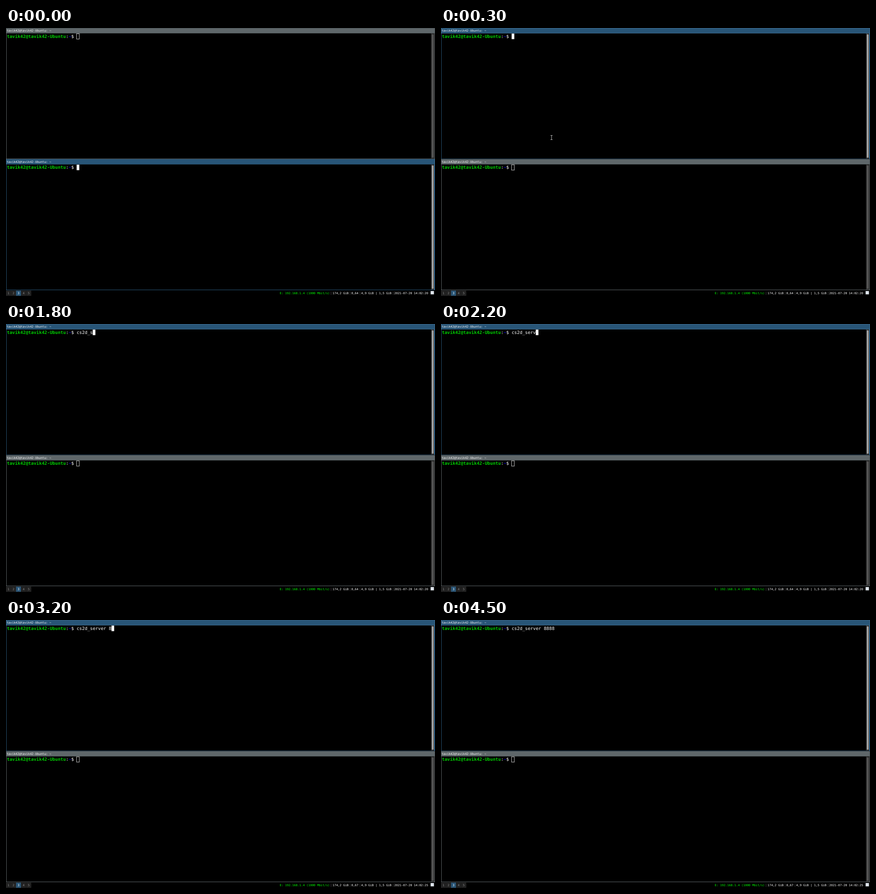
Animation of 947x592 px, one loop 5 s. Source, as an HTML page:

```html
<!DOCTYPE html>
<html lang="en">
<head>
<meta charset="utf-8">
<title>Two terminals</title>
<style>
  html, body { margin: 0; width: 100%; height: 100%; overflow: hidden; background: #000; }
  svg { display: block; width: 100vw; height: 100vh; }
  text { font-family: "DejaVu Sans Mono", monospace; white-space: pre; text-rendering: geometricPrecision; }
  .small { font-size: 6.555px; }
  .term { font-size: 9.832px; }
  .bold { font-weight: bold; }
</style>
</head>
<body>
<svg id="stage" viewBox="0 0 947 592" preserveAspectRatio="none"></svg>
<script>
const LOOP = 5000;
const CELL = 5.919;
const LEFT = 2;
const PROMPT = 26;
const USER = "tavik42";
const HOST = USER + "-Ubuntu";
const COMMAND = "cs2d_server 8888";

// [time, typed characters]
const KEYS = [[0, 0], [800, 1], [900, 2], [1400, 4], [1600, 5], [1800, 6], [1900, 7], [2000, 8],
  [2200, 9], [2300, 11], [2500, 12], [3200, 13], [3400, 15], [3600, 16]];
// [time, pointer height]; null hides it
const POINTER = [[0, null], [100, 334], [200, 302], [300, 242], [400, 211], [800, null]];
const FOCUS_AT = 300, CLOCK_AT = 3000, ENTER_AT = 3900;

const ACTIVE = { edge: "#4c7899", bar: "#285577", side: "#2e9ef4", trough: "#313131", thumb: "#a4a4a4" };
const IDLE = { edge: "#33383a", bar: "#5f676a", side: "#484e50", trough: "#2b2b2b", thumb: "#565656" };

const stage = document.getElementById("stage");

function add(tag, attrs, parent = stage) {
  const el = document.createElementNS("http://www.w3.org/2000/svg", tag);
  set(el, attrs);
  parent.appendChild(el);
  return el;
}

function set(el, attrs) {
  for (const key in attrs) el.setAttribute(key, attrs[key]);
}

function rect(x, y, width, height, fill, parent) {
  return add("rect", { x, y, width, height, fill }, parent);
}

function label(x, y, str, fill, cls = "small", parent) {
  const el = add("text", { x, y, fill, class: cls }, parent);
  el.textContent = str;
  return el;
}

const show = (el, on) => el.setAttribute("visibility", on ? "visible" : "hidden");
const at = (steps, t) => steps.filter(s => s[0] <= t).pop()[1];
const column = n => LEFT + n * CELL;

function makeWindow(y) {
  const g = add("g", { transform: `translate(0 ${y})` });
  const edge = rect(0, 0, 947, 12, "", g);
  const bar = rect(0.5, 0.5, 946, 11, "", g);
  const frame = rect(0, 12, 947, 277.5, "", g);
  const side = rect(946, 12, 1, 276.5, "", g);
  rect(1, 12, 945, 276.5, "#000", g);
  const trough = rect(938, 12, 8, 276.5, "", g);
  const thumb = rect(940, 13.7, 4, 273, "", g);
  thumb.setAttribute("rx", 2);
  label(1.4, 8, `${USER}@${HOST}: ~`, "#fff", "small", g);

  const row = (n, str, fill, cls = "term") => label(column(n), 21.6, str, fill, cls, g);
  row(0, `${USER}@${HOST}`, "#00cd00", "term bold");
  row(22, ":", "#fff");
  row(23, "~", "#0000cd", "term bold");
  row(24, "$", "#fff");
  const input = row(PROMPT, "", "#fff");

  const solid = rect(0, 12.4, CELL, 12.2, "#fff", g);
  const hollow = add("rect", { x: column(PROMPT) - 0.1, y: 12.6, width: CELL + 0.1, height: 11.8,
    fill: "none", stroke: "#e4e4e4", "stroke-width": 0.9 }, g);

  return {
    input, solid,
    focus(on) {
      const c = on ? ACTIVE : IDLE;
      set(edge, { fill: c.edge });
      set(bar, { fill: c.bar });
      set(frame, { fill: c.bar });
      set(side, { fill: c.side });
      set(trough, { fill: c.trough });
      set(thumb, { fill: c.thumb });
      show(hollow, !on);
    }
  };
}

rect(0, 0, 947, 592, "#000");
const upper = makeWindow(0);
const lower = makeWindow(289.5);

// Workspace buttons
for (let i = 0; i < 5; i++) {
  const on = i === 2, x = i * 11.2;
  add("rect", { x: x + 0.25, y: 580.3, width: 10.2, height: 10.8, fill: on ? "#285577" : "#222",
    stroke: on ? "#4c7899" : "#333", "stroke-width": 0.5 });
  label(x + 3.4, 588, i + 1, on ? "#fff" : "#888");
}

// Status bar
label(604.2, 588, "E: 192.168.1.4 (1000 Mbit/s)", "#00ff00");
label(720.8, 588, "174,2 GiB", "#fff");
const load = label(762.2, 588, "", "#fff");
label(784, 588, "4,9 GiB | 1,5 GiB", "#fff");
const clock = label(857, 588, "", "#fff");
for (const x of [717.4, 759.2, 781, 854]) rect(x, 582, 0.5, 7.5, "#777");
rect(937.3, 581, 7.4, 7.4, "#dfe5ec");

const pointer = add("path", { d: "M-2.3-4.6H2.3M0-4.6V4.6M-2.3 4.6H2.3", fill: "none",
  stroke: "#d8d8d8", "stroke-width": 0.9 });

function draw(t) {
  const top = t >= FOCUS_AT;
  upper.focus(top);
  lower.focus(!top);

  const typed = at(KEYS, t);
  const entered = t >= ENTER_AT;
  upper.input.textContent = COMMAND.slice(0, typed);
  set(upper.solid, { x: column(entered ? 0 : PROMPT + typed), y: entered ? 24.4 : 12.4 });
  show(upper.solid, top && !(t >= 3100 && t < 3200) && t < 4500);
  set(lower.solid, { x: column(PROMPT) });
  show(lower.solid, t < 200);

  const late = t >= CLOCK_AT;
  load.textContent = late ? "0,67" : "0,64";
  clock.textContent = "2021-07-20 14:02:" + (late ? 25 : 20);

  const y = at(POINTER, t);
  show(pointer, y !== null);
  if (y !== null) set(pointer, { transform: `translate(244 ${y})` });
}

const start = performance.now();
function tick() {
  draw((performance.now() - start) % LOOP);
  requestAnimationFrame(tick);
}
tick();
</script>
</body>
</html>
```
